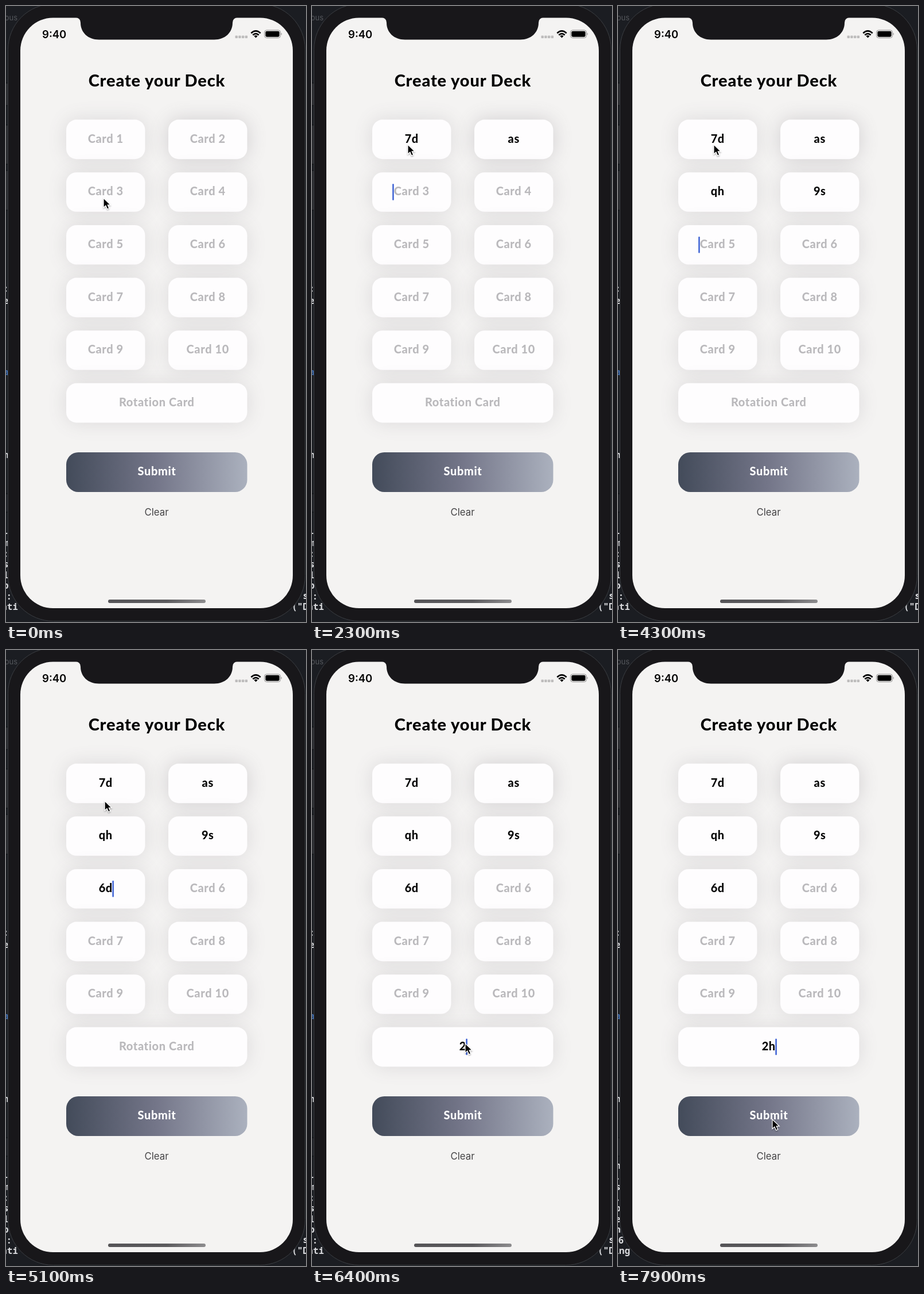
Recreate the animation shown at these times as an HTML page. Size 523x1071 px, loop 8000 ms.

```html
<!DOCTYPE html>
<html lang="en">
<head>
<meta charset="utf-8">
<title>Create your Deck</title>
<style>
  html, body { margin: 0; width: 100%; height: 100%; overflow: hidden; background: #1b1d22; }
  svg { display: block; width: 100vw; height: 100vh; }
  text { white-space: pre; }
  .brand { font-family: Lato, "Open Sans", sans-serif; font-weight: 800; text-anchor: middle; }
  .field { font-size: 20px; letter-spacing: .6px; }
  .ui { font-family: Inter, Roboto, sans-serif; text-anchor: middle; }
  .code { font: 600 16px "Noto Sans Mono", "DejaVu Sans Mono", monospace; fill: #d9dadd; text-anchor: end; }
</style>
</head>
<body>
<svg viewBox="0 0 523 1071" preserveAspectRatio="none">
  <defs>
    <filter id="soft" x="-60%" y="-120%" width="220%" height="340%">
      <feGaussianBlur stdDeviation="17"/>
    </filter>
    <filter id="lift" x="-50%" y="-50%" width="200%" height="200%">
      <feDropShadow dx="0" dy="1.5" stdDeviation="1.2" flood-opacity=".35"/>
    </filter>
    <linearGradient id="button">
      <stop offset="0" stop-color="#434b5a"/>
      <stop offset=".5" stop-color="#747689"/>
      <stop offset="1" stop-color="#abb1be"/>
    </linearGradient>
    <linearGradient id="bar">
      <stop offset="0" stop-color="#555457"/>
      <stop offset=".6" stop-color="#5c5b5e"/>
      <stop offset="1" stop-color="#8d8c8e"/>
    </linearGradient>
  </defs>

  <!-- editor behind the phone -->
  <rect width="523" height="1071" fill="#1b1d22"/>
  <g fill="#2b2c30" stroke="#0b0c0e">
    <rect x="-5" y="134" width="14" height="39"/>
    <rect x="-5" y="207" width="14" height="68"/>
    <rect x="-5" y="286" width="14" height="69"/>
    <rect x="-5" y="848" width="14" height="32" fill="#202227"/>
  </g>
  <text x="20" y="25" class="ui" style="font-size:13px;text-anchor:end" fill="#55575c">ous</text>
  <g id="editor"></g>
  <g id="console"></g>

  <!-- phone -->
  <rect x="3.5" y="-3.5" width="518" height="1073" rx="79" fill="#18171a" stroke="#3b3e42"/>
  <rect x="25" y="20.5" width="475" height="1026.5" rx="57" fill="#f4f3f2"/>
  <path d="M120 19.5Q130 20.500 130 29C130 46 143 58.500 162 58.500H363C382 58.500 395 46 395 29Q395 20.500 405 19.500Z" fill="#18171a"/>

  <!-- status bar -->
  <text x="84.200" y="55.500" class="ui" font-size="18.500" font-weight="600">9:40</text>
  <g fill="#bdbcbc">
    <rect x="399.500" y="51.500" width="4.500" height="4.500" rx="1"/>
    <rect x="405.200" y="51.500" width="4.500" height="4.500" rx="1"/>
    <rect x="410.900" y="51.500" width="4.500" height="4.500" rx="1"/>
    <rect x="416.600" y="51.500" width="4.500" height="4.500" rx="1"/>
  </g>
  <g fill="none" stroke="#000" stroke-width="2.600">
    <path d="M427.300 47.200Q435.500 39.500 443.700 47.200"/>
    <path d="M430.300 50.500Q435.500 45.700 440.700 50.500"/>
  </g>
  <path d="M432.400 52.300Q435.500 49.700 438.600 52.300L435.500 55.500Z"/>
  <rect x="450.500" y="42" width="28" height="13.500" rx="4" fill="none" stroke="#8e8d8d"/>
  <rect x="452.300" y="43.800" width="24.400" height="9.900" rx="2.400"/>
  <path d="M479.700 46.500Q482 48.700 479.700 51Z" fill="#8e8d8d"/>

  <text x="263" y="139.500" class="brand" font-size="29" letter-spacing=".85">Create your Deck</text>
  <g id="cards"></g>
  <rect x="105" y="776" width="315.500" height="69" rx="21" fill="url(#button)"/>
  <text x="263" y="816" class="brand field" fill="#fff">Submit</text>
  <text x="262.500" y="885.500" class="ui" font-size="16.800" fill="#454446">Clear</text>
  <rect x="178" y="1032" width="170" height="6" rx="3" fill="url(#bar)"/>

  <rect id="caret" width="2.500" height="28.500" rx="1" fill="#3a5fd3"/>
  <path id="pointer" d="M0 0V16.500L3.900 13L6.600 19L9.700 17.700L7.200 11.900H12.200Z" stroke="#fff" stroke-width="1.200" filter="url(#lift)"/>
</svg>
<script>
const LOOP = 8000, BLINK = 1000, LOG_AT = 7700;
const byId = id => document.getElementById(id);

function add(parent, tag, attrs, text = "") {
  const node = document.createElementNS("http://www.w3.org/2000/svg", tag);
  for (const key in attrs) node.setAttribute(key, attrs[key]);
  node.textContent = text;
  return parent.appendChild(node);
}

function makeCard(index) {
  const wide = index === 10;
  const x = index % 2 ? 283 : 105;
  const y = 197.6 + 91.65 * Math.floor(index / 2);
  const width = wide ? 315.5 : 137.5;
  const box = { x, y, width, height: 68.6, rx: 18 };
  const cards = byId("cards");
  add(cards, "rect", { ...box, fill: "#5c5560", opacity: index === 1 ? .23 : .16, filter: "url(#soft)" });
  add(cards, "rect", { ...box, fill: "#fefdfe" });
  const center = x + width / 2;
  const label = add(cards, "text", { x: center, y: y + 40, class: "brand field" });
  return { center, y, label, hint: wide ? "Rotation Card" : "Card " + (index + 1) };
}

const cards = Array.from({ length: 11 }, (_, i) => makeCard(i));

// [time, focused card, its text]
const edits = [
  [700, 0, ""], [1300, 0, "7"], [1500, 0, "7d"],
  [1700, 1, ""], [1900, 1, "a"], [2050, 1, "as"],
  [2250, 2, ""], [2800, 2, "q"], [2950, 2, "qh"],
  [3200, 3, ""], [3650, 3, "9"], [3800, 3, "9s"],
  [4100, 4, ""], [4600, 4, "6"], [4800, 4, "6d"],
  [6100, 10, ""], [6350, 10, "2"], [6600, 10, "2h"]
];

// [start, end, x, y]: the pointer arrives at x, y at the end time
const moves = [
  [0, 0, 170, 334], [100, 650, 167, 241], [5000, 5700, 257, 621],
  [5700, 6050, 267, 684], [7200, 7700, 269, 816]
];

const editorLines = [[":", 497], ["e", 518], ["n", 786]];
const logBefore = ["", "-", "m", ":", "s", "l", "b", "e:", "ati"];
const logAfter = ["n", ".", "s", ".", "b", "e", "n", " 6", "ing"];

for (const [text, y] of editorLines) add(byId("editor"), "text", { x: 4.5, y, class: "code" }, text);
add(byId("editor"), "text", { x: 4.5, y: 642, class: "code", style: "fill:#3f6fb5" }, "a");
const logRows = logBefore.map((_, i) =>
  add(byId("console"), "text", { x: [4.5, 10, 21][Math.max(0, i - 6)], y: 902 + 18.5 * i, class: "code" }));
const sideLog = [["s", 1031], ['("D', 1050]].map(([text, y]) =>
  add(byId("console"), "text", { x: 527, y, class: "code" }, text));

const ease = p => p * p * (3 - 2 * p);

function pointerAt(time) {
  let [, , x, y] = moves[0];
  for (const [start, end, toX, toY] of moves.slice(1)) {
    if (time < start) break;
    const p = ease(Math.min(1, (time - start) / (end - start)));
    x += (toX - x) * p;
    y += (toY - y) * p;
  }
  return [x, y];
}

function render(time) {
  const values = cards.map(() => "");
  let last = null;
  for (const edit of edits) {
    if (edit[0] > time) break;
    values[edit[1]] = edit[2];
    last = edit;
  }
  cards.forEach(({ label, hint }, i) => {
    label.textContent = values[i] || hint;
    label.setAttribute("fill", values[i] ? "#080808" : "#bab9bc");
  });

  const caret = byId("caret");
  const visible = last && (time - last[0]) % BLINK < BLINK * .55;
  caret.setAttribute("visibility", visible ? "visible" : "hidden");
  if (last) {
    const { center, y, label } = cards[last[1]];
    const half = label.getComputedTextLength() / 2;
    caret.setAttribute("x", last[2] ? center + half - .5 : center - half - 2.5);
    caret.setAttribute("y", y + 20);
  }

  byId("pointer").setAttribute("transform", `translate(${pointerAt(time)})`);

  const logged = time >= LOG_AT;
  logRows.forEach((row, i) => { row.textContent = (logged ? logAfter : logBefore)[i]; });
  sideLog.forEach(row => row.setAttribute("visibility", logged ? "hidden" : "visible"));
}

const began = performance.now();
function tick() {
  render((performance.now() - began) % LOOP);
  requestAnimationFrame(tick);
}
tick();
</script>
</body>
</html>
```
